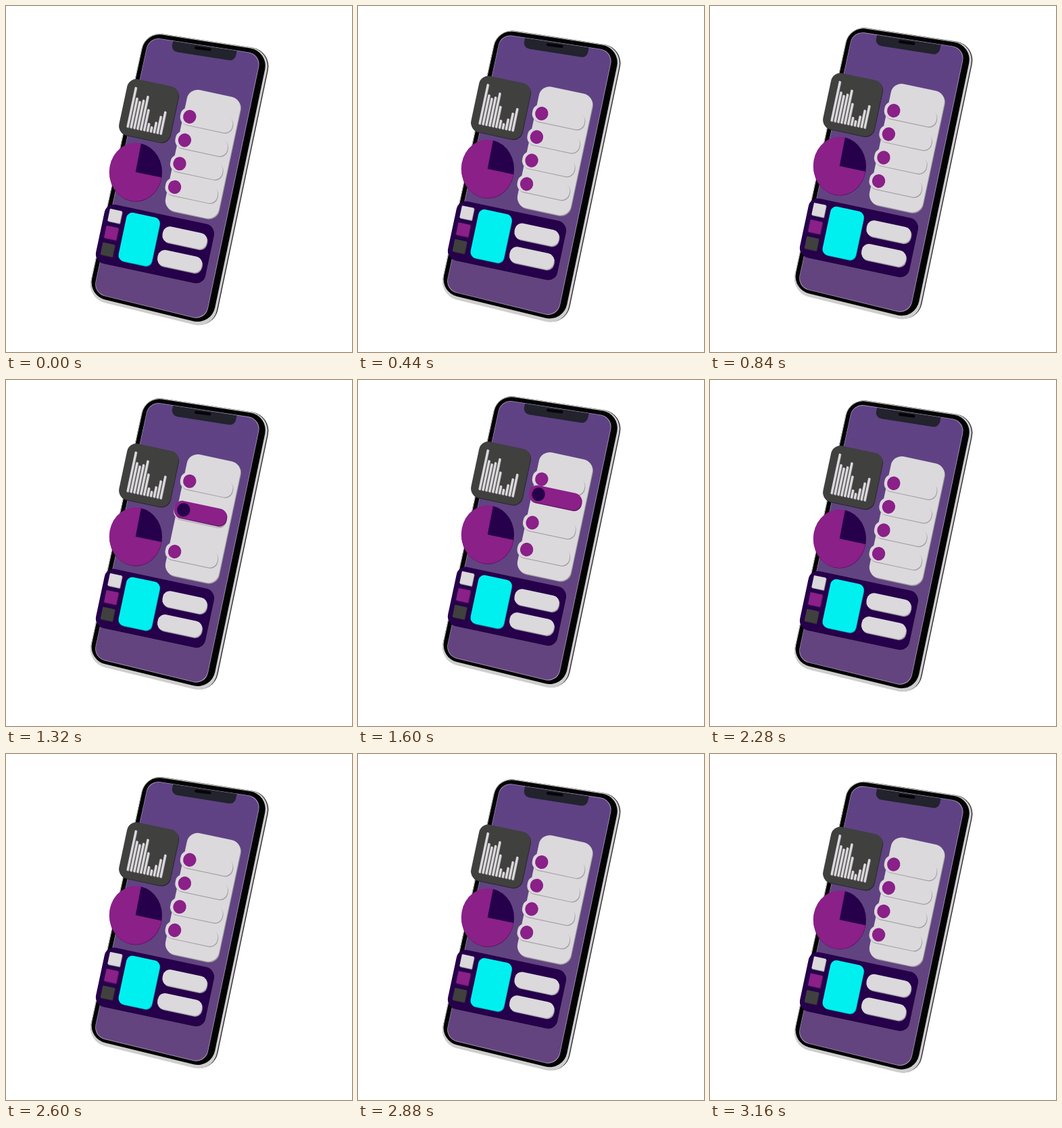
Recreate the animation shown at these times as an HTML page with a canvas. Size 512 by 512 pixels, loop 3200 ms.

```html
<!DOCTYPE html>
<html lang="en">
<head>
<meta charset="utf-8">
<title>Phone dashboard</title>
<style>
html, body { margin: 0; width: 100%; height: 100%; overflow: hidden; background: #fff; }
canvas { display: block; width: 512px; height: 512px; }
</style>
</head>
<body>
<canvas id="stage" width="512" height="512"></canvas>
<script>
const ctx = document.getElementById('stage').getContext('2d');
const LOOP = 3200, STEP = 40, TILT = 0.21;
const PURPLE = [138, 32, 136], INK = [38, 0, 75], PALE = [219, 217, 220];
const SHADE = [158, 155, 160], PLUM = [96, 18, 98], COAL = [64, 64, 63], SOOT = [40, 40, 40];
const CYAN = [0, 240, 240], TEAL = [11, 148, 162], NIGHT = [25, 0, 47];

const clamp = v => Math.max(0, Math.min(1, v));
const lerp = (a, b, k) => a + (b - a) * k;
const mix = (a, b, k) => a.map((v, i) => lerp(v, b[i], k));
const rgb = c => `rgb(${c.map(Math.round).join(',')})`;

// Runs a drawing in a tilted frame centred at (x, y)
function tilted(x, y, draw) {
  ctx.save();
  ctx.translate(x, y);
  ctx.rotate(TILT);
  draw();
  ctx.restore();
}

// Raised rounded box, centred at (u, v) in the current frame
function box(u, v, w, h, r, face, side, depth = 0.6) {
  for (const [d, color] of [[depth, side], [-0.4, face]]) {
    ctx.beginPath();
    ctx.roundRect(u - w / 2 + d, v - h / 2 + d, w, h, r);
    ctx.fillStyle = rgb(color);
    ctx.fill();
  }
}

function disc(x, y, rx, ry, color) {
  ctx.beginPath();
  ctx.ellipse(x, y, rx, ry, 0, 0, 2 * Math.PI);
  ctx.fillStyle = rgb(color);
  ctx.fill();
}

// Phone outline in perspective: clockwise from the top left
const BODY = [[206, 37], [394, 65.5], [307.3, 479], [119.5, 433]];
const WIDTH = 188, HEIGHT = 404;

function onBody(x, y) {
  const u = x / WIDTH, v = y / HEIGHT;
  return mix(mix(BODY[0], BODY[1], u), mix(BODY[3], BODY[2], u), v);
}

// Rounded layer inset from the left, top, right and bottom of the body
function layer(l, t, r, b, radius, fill) {
  const right = WIDTH - r, bottom = HEIGHT - b;
  const p = [onBody(l, t), onBody(right, t), onBody(right, bottom), onBody(l, bottom)];
  ctx.beginPath();
  ctx.moveTo(...mix(p[0], p[1], 0.5));
  for (let i = 1; i <= 4; i++) ctx.arcTo(...p[i % 4], ...p[(i + 1) % 4], radius);
  ctx.closePath();
  ctx.fillStyle = fill;
  ctx.fill();
}

function phone() {
  layer(0.3, 0.5, 0, 1, 28, '#262526');
  layer(0.2, 0.7, 1.3, 0.2, 28, '#cfcdce');
  layer(1.2, 1.8, 4.7, 5, 26, '#030304');
  layer(7.2, 7.8, 14.2, 9.8, 18, '#a99bb9');
  const glass = ctx.createLinearGradient(260, 50, 220, 460);
  glass.addColorStop(0, '#5f4285');
  glass.addColorStop(1, '#64447e');
  ctx.save();
  layer(7.8, 8.5, 15, 10.6, 18, glass);
  ctx.clip();
  layer(43, -5, 50.5, HEIGHT - 23.5, 9, '#22232d');
  ctx.restore();

  ctx.lineCap = 'round';
  ctx.lineWidth = 4.5;
  ctx.strokeStyle = '#050507';
  ctx.beginPath();
  ctx.moveTo(...onBody(78, 13));
  ctx.lineTo(...onBody(98, 12.5));
  ctx.stroke();
}

function chart() {
  box(0, 0, 77.5, 84.5, 14, COAL, SOOT);
  [61, 46, 42, 45, 52, 33, 13, 9, 17, 27, 35].forEach((h, i) => {
    box(5 * i - 25.6, 30.7 - h / 2, 3.2, h, 1, PALE, SHADE, 0.3);
  });
}

function pie() {
  const x = 191.7, y = 245.7;
  disc(x + 0.4, y + 0.8, 39, 43.2, PLUM);
  disc(x, y, 38.9, 43.2, PURPLE);
  ctx.beginPath();
  ctx.moveTo(x, y);
  ctx.ellipse(x, y, 39.2, 43.2, 0, TILT - Math.PI / 2, TILT - 0.02);
  ctx.closePath();
  ctx.fillStyle = rgb(INK);
  ctx.fill();
}

function row(slot, on) {
  const u = -31.1, v = 35.5 * slot - 50.4;
  box(u + 25.8, v + 0.2, 78.6, 25.6, 11.5, mix(PALE, PURPLE, on), mix(SHADE, PLUM, on));
  disc(u, v, 9.7, 10.1, mix(PURPLE, INK, on));
}

function list(t) {
  box(0, 0, 80.6, 183.5, 16, PALE, SHADE, 0.8);
  // The third row lights up and climbs to the top; the rows it passes drop one slot
  const slide = 487, start = 940;
  const moved = from => clamp((t - start - from * slide) / slide);
  const on = clamp((t - 870) / 80) * (1 - clamp((t - 2040) / 120));
  row(3, 0);
  row(1 + moved(0.5), 0);
  row(moved(1.5), 0);
  row(2 - moved(0) - moved(1), on);
}

function dock() {
  box(0, 0, 165, 88.5, 14, INK, NIGHT, 0.3);
  [[PALE, SHADE], [PURPLE, PLUM], [COAL, SOOT]].forEach(([face, side], i) => {
    box(-66.3, 25.4 * i - 27.5, 18.4, 18.4, 1, face, side);
  });
  box(-24, -1.4, 50.3, 73.3, 9, CYAN, TEAL, 0.5);
  for (const v of [-17.6, 18]) box(41.5, v, 66.6, 24, 10.5, PALE, SHADE, 0.8);
}

function lift(t) {
  const peak = 1690, height = 18;
  return height * Math.min(t / peak, (LOOP - t) / (LOOP - peak));
}

function draw(t) {
  ctx.setTransform(1, 0, 0, 1, 0, 0);
  ctx.fillStyle = '#fff';
  ctx.fillRect(0, 0, 512, 512);
  ctx.translate(0, -lift(t));
  phone();
  tilted(211.5, 155.4, chart);
  pie();
  tilted(291.7, 219.6, () => list(t));
  tilted(220.5, 352, dock);
}

const began = performance.now();
function tick() {
  const t = (performance.now() - began) % LOOP;
  draw(Math.floor(t / STEP) * STEP);
  requestAnimationFrame(tick);
}
tick();
</script>
</body>
</html>
```
